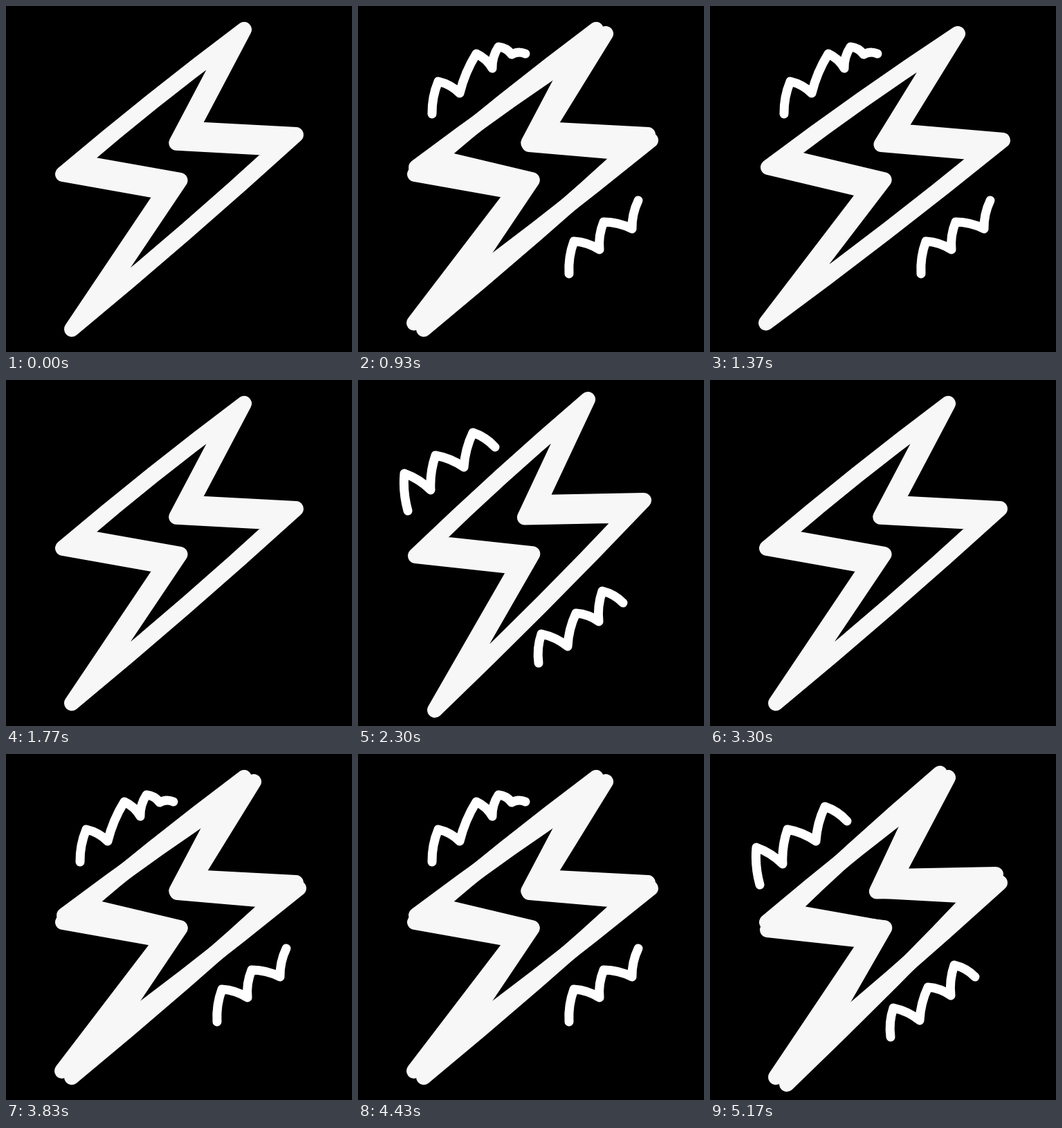
Animation, 500 px wide and 500 px high, one loop 5.21 s. Source, as an HTML page:

```html
<!DOCTYPE html>
<html lang="en">
<head>
<meta charset="utf-8">
<title>Lightning bolt</title>
<style>
  html, body { margin: 0; width: 100%; height: 100%; overflow: hidden; background: #000; }
  svg { display: block; width: 100vw; height: 100vh; }
  path { stroke-linecap: round; stroke-linejoin: round; }
  .bolt { fill: #f7f7f7; fill-rule: evenodd; stroke: #f7f7f7; stroke-width: 22; }
  .spark { fill: none; stroke: #fff; stroke-width: 13; }
</style>
</head>
<body>
<svg viewBox="0 0 500 500"></svg>
<script>
const FPS = 30, LOOP = 5210, PHRASE_FRAMES = 87, JOLT_FRAMES = 17.4;
// How far the hole lies inside each kind of edge: tip to notch, notch to tip, tip to tip
const INSETS = [10, 21, 2];
const svg = document.querySelector("svg");

const parse = text => text.split(" ").map(pair => pair.split(",").map(Number));

// Curve from a to b that bows to the left of the direction of travel
function bow(a, b, amount) {
  const dx = b[0] - a[0], dy = b[1] - a[1], length = Math.hypot(dx, dy);
  const x = (a[0] + b[0]) / 2 + dy / length * amount;
  const y = (a[1] + b[1]) / 2 - dx / length * amount;
  return `Q${x} ${y} ${b}`;
}

// Clockwise outline: only the long edges between two tips are bowed
function outline(points) {
  const [top, notch, right, bottom, backNotch, left] = points;
  return `M${top}L${notch}L${right}${bow(right, bottom, 5)}L${backNotch}L${left}${bow(left, top, 5)}Z`;
}

// Move every edge inwards and intersect it with the edge before it
function shrink(points) {
  const lines = points.map((p, i) => {
    const q = points[(i + 1) % points.length];
    const length = Math.hypot(q[0] - p[0], q[1] - p[1]);
    const nx = (p[1] - q[1]) / length, ny = (q[0] - p[0]) / length;
    return [nx, ny, nx * p[0] + ny * p[1] + INSETS[i % 3]];
  });
  return lines.map(([a, b, c], i) => {
    const [d, e, f] = lines.at(i - 1);
    const det = a * e - b * d;
    return [(c * e - b * f) / det, (a * f - c * d) / det];
  });
}

function zigzag(points) {
  return points.reduce((path, p, i) => path + (i ? bow(points[i - 1], p, 5) : `M${p}`), "");
}

function add(parent, tag, attributes = {}) {
  const node = document.createElementNS("http://www.w3.org/2000/svg", tag);
  for (const [name, value] of Object.entries(attributes)) node.setAttribute(name, value);
  return parent.appendChild(node);
}

function pose(corners, ...sparks) {
  const group = add(svg, "g"), points = parse(corners);
  add(group, "path", { class: "bolt", d: outline(points) + outline(shrink(points)) });
  for (const spark of sparks) add(group, "path", { class: "spark", d: zigzag(parse(spark)) });
  return group;
}

const rest = pose("344,34 268,178 419,186 95,467 228,269 82,243");
const right = pose("358,40 271,181 423,194 81,458 227,267 84,233",
  "107,156 116,109 147,126 171,69 194,90 203,59 222,70 242,69",
  "305,387 312,340 349,352 355,312 396,322 405,281");
const left = pose("332,28 262,177 413,174 111,477 230,270 83,254",
  "72,189 67,135 105,159 112,109 153,126 166,76 198,97",
  "261,409 265,367 303,385 315,337 348,349 353,305 383,322");

const show = (node, visible) => { node.style.display = visible ? "" : "none"; };

// Neighbouring poses overlap for about a frame within each jolt
function draw() {
  const time = performance.now() % LOOP;
  const frame = Math.floor((time + 5) * FPS / 1000) % PHRASE_FRAMES;
  const phase = frame % JOLT_FRAMES;
  const between = (start, end) => phase >= start && phase < end;
  show(rest, !between(5.7, 10.5) && phase < 16.5);
  show(right, between(5.7, 11.7));
  show(left, phase >= 15.5);
  requestAnimationFrame(draw);
}
draw();
</script>
</body>
</html>
```
